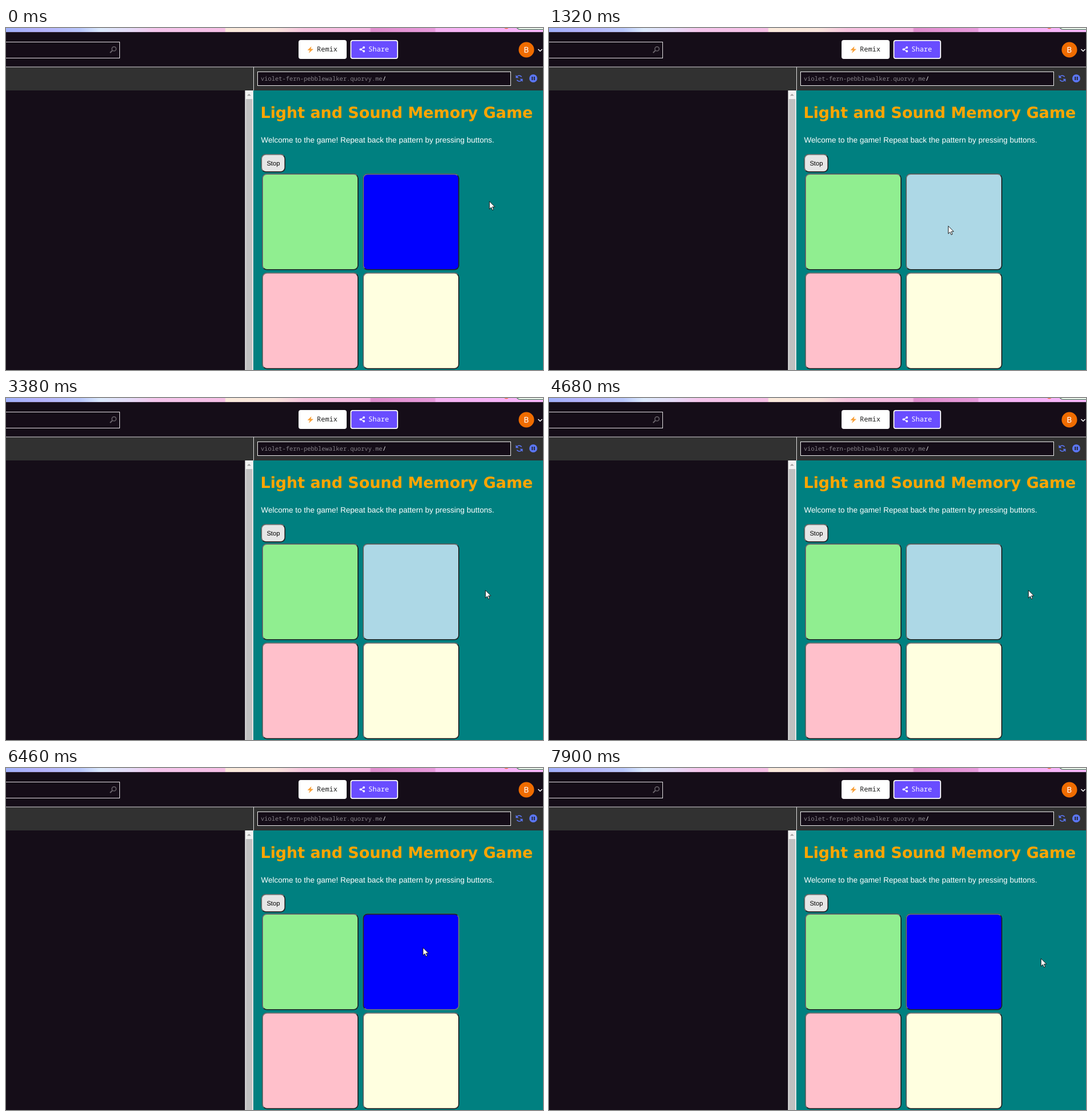
An HTML page with a canvas that plays this animation: 938x597 px, repeating every 8000 ms.

```html
<!DOCTYPE html>
<html lang="en">
<head>
<meta charset="utf-8">
<title>Light and Sound Memory Game</title>
<style>
html, body { margin: 0; width: 100%; height: 100%; overflow: hidden; background: #150d18; }
canvas { display: block; }
</style>
</head>
<body>
<canvas id="stage" width="938" height="597"></canvas>
<script>
const ctx = document.getElementById('stage').getContext('2d');
const LOOP = 8000;
const DARK = '#150d18';
const SANS = '"Liberation Sans", Arial, sans-serif';
const MONO = '"Noto Sans Mono", "DejaVu Sans Mono", monospace';

// Pointer trips: start, end, number of moves, from, to
const trips = [
  [300, 880, 4, [844, 302], [697, 345]],
  [1460, 2020, 4, [697, 345], [837, 335]],
  [4960, 5420, 3, [837, 335], [728, 313]],
  [7050, 7200, 1, [728, 313], [859, 332]]
];
const flashes = [[0, 150], [2320, 3380], [3680, 4680], [7900, 8000]];
const presses = [[1020, 1320], [5570, 6000], [6460, 6900]];

const during = (spans, t) => spans.some(([a, b]) => t >= a && t < b);

function pointerAt(t) {
  let pos = trips[0][3];
  for (const [start, end, moves, from, to] of trips) {
    if (t < start) break;
    const step = Math.floor((t - start) / (end - start) * moves + 0.001);
    const p = Math.min(1, (step + 1) / (moves + 1));
    const e = p * p * (3 - 2 * p);
    pos = from.map((v, i) => v + (to[i] - v) * e);
  }
  return pos;
}

function rect(x, y, w, h, color) {
  ctx.fillStyle = color;
  ctx.fillRect(x, y, w, h);
}

function round(x, y, w, h, r, color) {
  ctx.fillStyle = color;
  ctx.beginPath();
  ctx.roundRect(x, y, w, h, r);
  ctx.fill();
}

function disc(x, y, r, color) {
  ctx.fillStyle = color;
  ctx.beginPath();
  ctx.arc(x, y, r, 0, Math.PI * 2);
  ctx.fill();
}

function trace(points) {
  ctx.beginPath();
  points.forEach(([x, y]) => ctx.lineTo(x, y));
}

function line(points, color, width) {
  trace(points);
  ctx.strokeStyle = color;
  ctx.lineWidth = width;
  ctx.stroke();
}

function poly(points, color) {
  trace(points);
  ctx.closePath();
  ctx.fillStyle = color;
  ctx.fill();
}

function frame(x, y, w, h, color) {
  rect(x, y, w, h, color);
  rect(x + 1, y + 1, w - 2, h - 2, DARK);
}

function text(str, x, y, font, color) {
  ctx.font = font;
  ctx.fillStyle = color;
  ctx.fillText(str, x, y);
}

// Bevelled button; the two edge tones swap when it is held down
function button(x, y, w, h, color, down) {
  const b = 1.7, r = 8.4;
  const tones = ['#767676', '#212121'];
  if (down) tones.reverse();
  round(x, y, w, h, r, tones[1]);
  ctx.save();
  const k = Math.min(w, h) / 2;
  trace([[x, y], [x + w, y], [x + w - k, y + k], [x + k, y + h - k], [x, y + h]]);
  ctx.clip();
  round(x, y, w, h, r, tones[0]);
  ctx.restore();
  round(x + b, y + b, w - 2 * b, h - 2 * b, r - b, color);
}

function topStrip() {
  const g = ctx.createLinearGradient(0, 0, 938, 0);
  [[0, '#9fb0fa'], [60, '#b5b2fb'], [130, '#b9c7fb'], [165, '#dceafc'],
   [215, '#e4dcf8'], [260, '#f5c6ec'], [382, '#f6bfe5'], [384, '#fbeadb'],
   [470, '#f9e6dc'], [520, '#f7c3df'], [635, '#f5b8e3'], [638, '#df8dcd'],
   [690, '#e494d4'], [749, '#e79bdc'], [751, '#f6b3f3'], [938, '#f7b6fb']
  ].forEach(([x, c]) => g.addColorStop(x / 938, c));
  rect(0, 0, 938, 7, g);
  rect(0, 7, 938, 1, '#3a2b3d');
  disc(874, -3, 4.5, '#ee7040');
  ctx.beginPath();
  ctx.roundRect(891, -16, 60, 18.5, 7);
  ctx.fillStyle = '#f4f8f3';
  ctx.fill();
  ctx.strokeStyle = '#327348';
  ctx.lineWidth = 1.2;
  ctx.stroke();
}

function header() {
  frame(-2, 24, 201, 29, '#e2e0e3');
  ctx.beginPath();
  ctx.arc(188.7, 36.4, 3.7, 0, Math.PI * 2);
  ctx.strokeStyle = '#69646b';
  ctx.lineWidth = 1.5;
  ctx.stroke();
  line([[185.8, 39.3], [181.8, 43.2]], '#69646b', 2);

  round(511, 21, 84, 33, 4, '#fff');
  poly([[533.5, 32], [526.5, 38.7], [530.7, 38.9], [528.8, 44],
        [537, 36.7], [532.6, 36.5]], '#f8a13a');
  text('Remix', 543, 41, '12px ' + MONO, '#222');

  round(601.5, 21, 83.3, 33, 4, '#fff');
  round(603.3, 22.8, 79.7, 29.4, 2.5, '#694dff');
  line([[625, 34], [619.5, 37.3], [625, 40.5]], '#fff', 1.3);
  [[625, 34], [619.3, 37.3], [625, 40.5]].forEach(([x, y]) => disc(x, y, 1.9, '#fff'));
  text('Share', 633, 41, '12px ' + MONO, '#fff');

  disc(909, 38, 13.5, '#ef6c00');
  text('B', 904.4, 43, '14px Roboto, ' + SANS, '#fff');
  line([[929.5, 37], [933, 40.5], [936.5, 37]], '#fff', 1.5);
}

function toolbar() {
  rect(0, 68, 938, 41, '#313131');
  rect(0, 67.5, 938, 1, '#d8d6d9');
  rect(432, 68, 1, 41, '#dedede');
  frame(439, 76, 443, 25, '#eeeeee');
  const font = '10.43px ' + MONO;
  text('violet-fern-pebblewalker.quorvy.me', 445, 91.5, font, '#87838a');
  text('/', 657.8, 91.5, font, '#fff');

  const blue = '#5b76f7';
  for (const turn of [0, Math.PI]) {
    ctx.save();
    ctx.translate(896.5, 88);
    ctx.rotate(turn);
    ctx.beginPath();
    ctx.arc(0, 0, 4.9, Math.PI * 1.08, Math.PI * 1.82);
    ctx.strokeStyle = blue;
    ctx.lineWidth = 1.7;
    ctx.stroke();
    poly([[-6, -6], [-6, -0.8], [-0.9, -0.8]], blue);
    ctx.restore();
  }
  disc(921, 88, 7, blue);
  rect(918.3, 85, 1.9, 6, '#24232b');
  rect(921.8, 85, 1.9, 6, '#24232b');
}

function scrollbar() {
  rect(417.5, 109, 14.5, 488, '#f1f1f1');
  rect(419, 124, 11.3, 473, '#c1c1c1');
  poly([[421, 118.3], [424.5, 114.8], [428, 118.3]], '#a3a3a3');
}

function game(lit, down) {
  rect(432, 109, 506, 488, '#008080');
  text('Light and Sound Memory Game', 444.5, 157,
    'bold 26.9px "DejaVu Sans", Verdana, sans-serif', '#ffa500');
  text('Welcome to the game! Repeat back the pattern by pressing buttons.',
    445.5, 200, '13.5px ' + SANS, '#fff');
  button(445.5, 220, 42.6, 32, '#e6e6e6');
  text('Stop', 455.4, 240, '11.2px ' + SANS, '#000');

  const size = 168.4;
  button(447.3, 254.2, size, size, '#90ee90');
  button(623.3, 254.2, size, size, lit ? '#0000ff' : '#add8e6', down);
  button(447.3, 427, size, size, '#ffc0cb');
  button(623.3, 427, size, size, '#ffffe0');
}

function pointer(x, y) {
  ctx.save();
  ctx.translate(x, y);
  ctx.scale(0.84, 0.84);
  const shape = [[0.5, 0.8], [0.5, 16.8], [4.2, 13.2], [6.7, 19],
                 [9.2, 17.9], [6.8, 12.2], [11.8, 12.2]];
  poly(shape, '#fff');
  ctx.strokeStyle = '#111';
  ctx.lineWidth = 1.1;
  ctx.stroke();
  ctx.restore();
}

function draw(t) {
  rect(0, 0, 938, 597, DARK);
  topStrip();
  header();
  toolbar();
  scrollbar();
  const down = during(presses, t);
  game(down || during(flashes, t), down);
  pointer(...pointerAt(t));
}

ctx.textRendering = 'geometricPrecision';
const begin = performance.now();
function tick() {
  draw((performance.now() - begin) % LOOP);
  requestAnimationFrame(tick);
}
tick();
</script>
</body>
</html>
```
